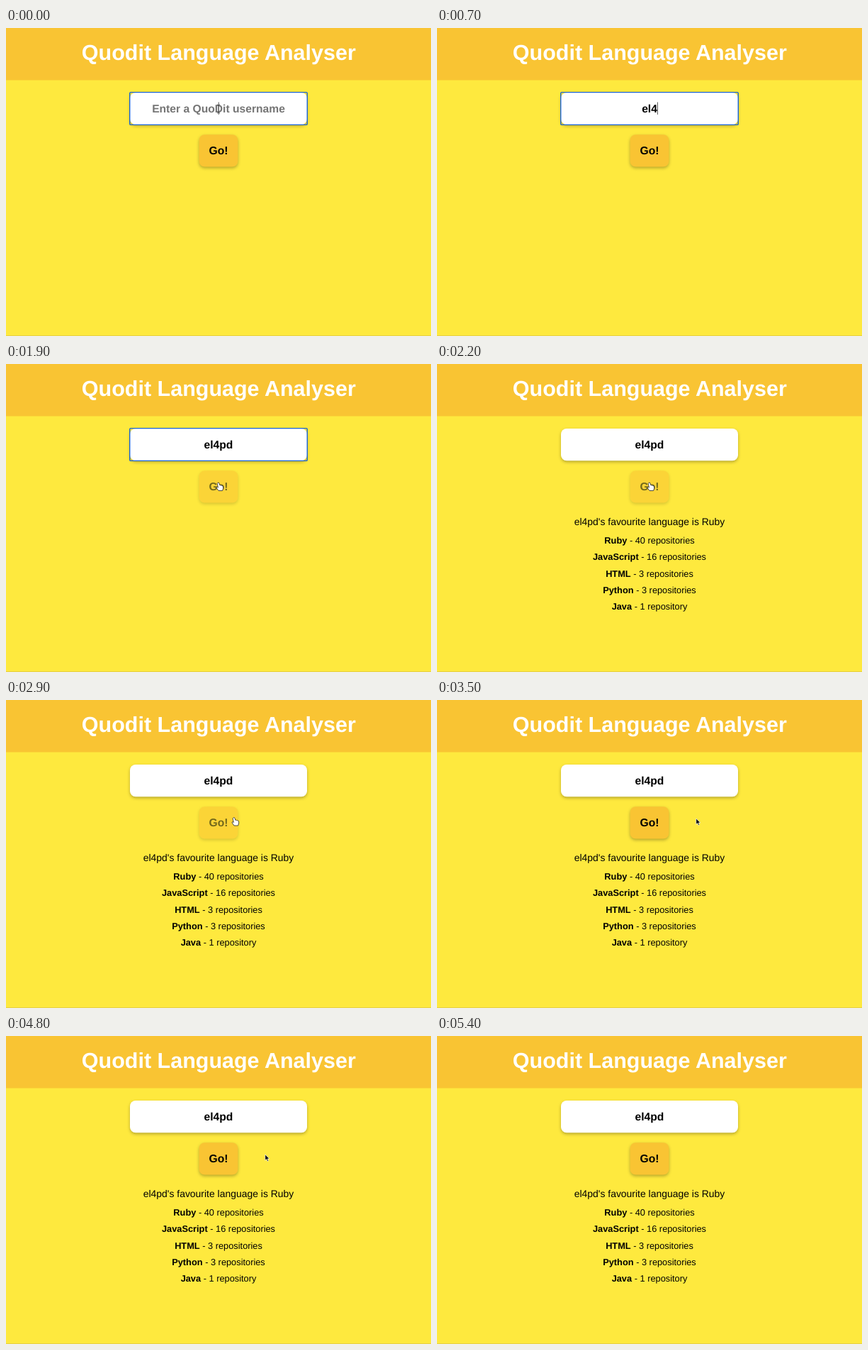
An HTML page for the animation above (5.5 s loop, 600 px wide and 434 px high).

```html
<!DOCTYPE html>
<html lang="en">
<head>
<meta charset="utf-8">
<title>Quodit Language Analyser</title>
<style>
  html, body { margin: 0; width: 100%; height: 100%; overflow: hidden; background: #fee93e; }
  svg { display: block; width: 600px; height: 434px; }
  text { font-family: "Liberation Sans", Arial, Helvetica, sans-serif; text-anchor: middle; text-rendering: geometricPrecision; }
  .bold { font-weight: bold; }
  .field { font-size: 15.65px; }
  .row { font-size: 12.8px; }
  .raised { filter: drop-shadow(0 2px 2px rgba(0, 0, 0, .28)); }
</style>
</head>
<body>
<svg viewBox="0 0 600 434">
  <rect width="600" height="434" fill="#fee93e"/>
  <rect width="600" height="73.5" fill="#f9c433"/>
  <rect y="433" width="600" height="1" fill="#e6cf45"/>
  <text class="bold" x="300.3" y="45" font-size="30.5" fill="#fff">Quodit Language Analyser</text>

  <rect class="raised" x="175" y="91" width="250" height="45.3" rx="8" fill="#fff"/>
  <rect id="ring" x="174.7" y="90.6" width="250.6" height="45.8" rx="1.5" fill="none" stroke="#1b64d2" stroke-width="1.4"/>
  <text id="hint" class="bold field" x="300" y="118.6" fill="#757575">Enter a QuoDit username</text>
  <text id="entry" class="bold field" x="300" y="118.6"></text>
  <rect id="caret" y="104.5" width="1" height="17.5" fill="#555"/>

  <g id="button">
    <rect class="raised" x="272.6" y="150.2" width="54.8" height="45.4" rx="8" fill="#f9c433"/>
    <text class="bold field" x="300" y="178">Go!</text>
  </g>

  <g id="results"></g>

  <g id="beam" fill="none" stroke="#444" stroke-width=".8">
    <path d="M-2-6Q0-6 0-4.500V4.500Q0 6-2 6M2-6Q0-6 0-4.500M0 4.500Q0 6 2 6"/>
  </g>
  <path id="arrow" d="M0 0V8.300L1.900 6.600 3.200 9.500 4.700 8.800 3.400 6H6Z" fill="#000" stroke="#fff" stroke-width=".7"/>
  <path id="hand" d="M-1.200-5Q0-6 1-4.700L1.800-1.700Q3-2.400 3.600-1.400Q4.700-2 5.200-.800Q6.600-1 6.600.500V3L5.600 6H0L-2.600 2.300Q-3.400.600-1.800.600L-.600 1.600-1.800-3.800Q-1.900-4.600-1.200-5Z" fill="#fff" stroke="#222" stroke-width=".8"/>
</svg>
<script>
const LOOP = 5500, STEP = 100;
const user = "el4pd";
const keyTimes = [200, 400, 700, 900, 1000];
const clickTime = 2000, resultTime = 2200;
const languages = [
  ["Ruby", 40], ["JavaScript", 16], ["HTML", 3], ["Python", 3], ["Java", 1]
];
// Pointer path: time, x, y
const path = [
  [0, 300, 114], [1300, 300, 114], [1600, 293.3, 150.6],
  [1800, 299.5, 171], [1900, 300, 172.5], [2600, 300, 172.5],
  [2900, 322, 171], [3200, 365.8, 167]
];

const el = id => document.getElementById(id);
const [ring, hint, entry, caret, button, results, beam, arrow, hand] =
  ["ring", "hint", "entry", "caret", "button", "results", "beam", "arrow", "hand"].map(el);
const show = (node, on) => node.setAttribute("visibility", on ? "visible" : "hidden");
const clamp = v => Math.min(1, Math.max(0, v));

const row = ([name, n], i) =>
  `<text class="row" x="300" y="${252.8 + i * 23.4}"><tspan class="bold">${name}</tspan>` +
  ` - ${n} ${n === 1 ? "repository" : "repositories"}</text>`;
results.innerHTML =
  `<text x="300" y="227" font-size="13.95">${user}'s favourite language is Ruby</text>` +
  languages.map(row).join("");

function pointer(t) {
  const i = path.findIndex(p => p[0] > t);
  if (i < 0) return path[path.length - 1].slice(1);
  const [a, b] = [path[i - 1], path[i]];
  const k = (t - a[0]) / (b[0] - a[0]);
  return [1, 2].map(n => a[n] + (b[n] - a[n]) * k);
}

function render(t) {
  const typed = keyTimes.filter(k => k <= t).length;
  const focused = t < clickTime;
  entry.textContent = user.slice(0, typed);
  show(hint, !typed);
  show(ring, focused);
  show(caret, focused && t < 1500);
  caret.setAttribute("x", typed ? 300 + entry.getComputedTextLength() / 2 : 299.7);

  // The button fades while the pointer is over it
  const fade = clamp((t - 1600) / 200) * (1 - clamp((t - 2900) / 200));
  button.setAttribute("opacity", 1 - .45 * fade);
  show(results, t >= resultTime);

  const [x, y] = pointer(t);
  const inField = y > 91 && y < 136;
  const over = t > 1600 && x < 327;
  const visible = t < 100 || (t >= 1400 && t < 5100);
  for (const node of [beam, arrow, hand]) node.setAttribute("transform", `translate(${x} ${y})`);
  show(beam, visible && inField);
  show(hand, visible && !inField && over);
  show(arrow, visible && !inField && !over);
}

const start = performance.now();
function tick() {
  const t = (performance.now() - start) % LOOP;
  render(Math.floor(t / STEP) * STEP);
  requestAnimationFrame(tick);
}
tick();
</script>
</body>
</html>
```
